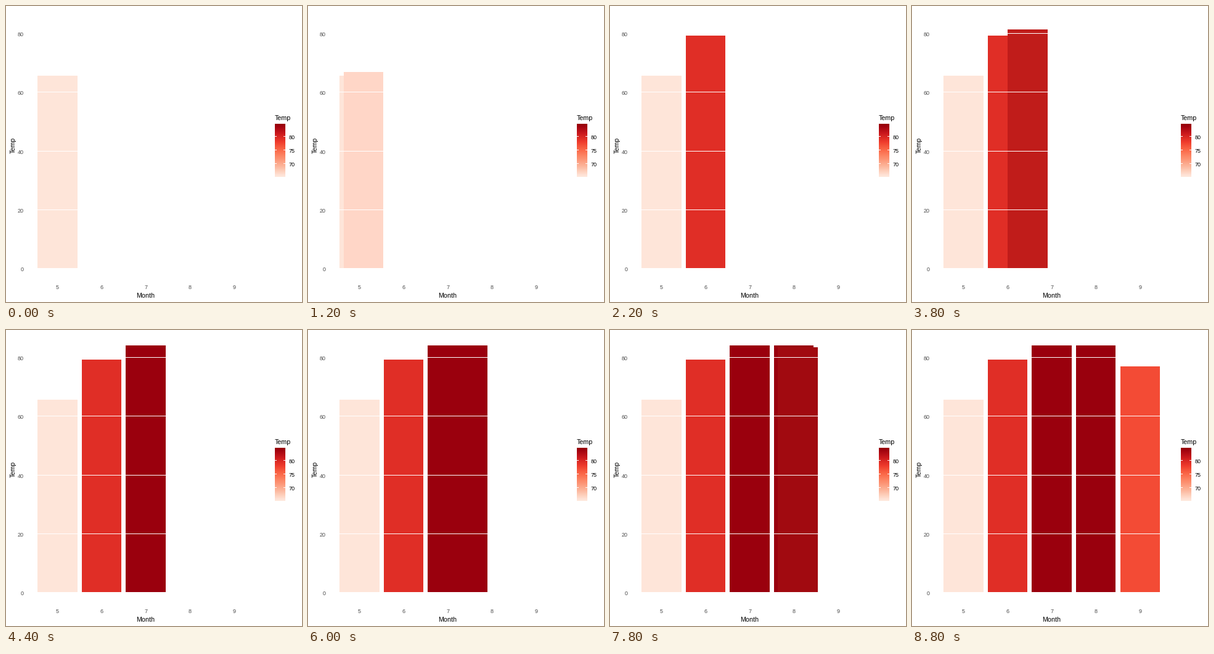
Recreate the animation shown at these times as a matplotlib script. Size 480x480 px, loop 10 s.

```python
import numpy as np
import matplotlib.pyplot as plt
from matplotlib.animation import FuncAnimation
from matplotlib.patches import Rectangle

SIZE, DPI = 480, 80
MONTHS = [5, 6, 7, 8, 9]
TEMPS = np.array([65.548, 79.1, 83.903, 83.968, 76.9])
REDS = ["FEE5D9", "FCBBA1", "FC9272", "FB6A4A", "EF3B2C", "CB181D", "99000D"]

# Timing in frames of 100 ms
FRAMES, INTERVAL = 100, 100
HOLD, MOVE = 11, 11

# Plot geometry in pixels
X0, STEP, BAR_W = 83.6, 71.53, 64.4
Y0, Y_SCALE = 425.4, 4.762

XYZ = np.array([[0.4124, 0.3576, 0.1805],
                [0.2126, 0.7152, 0.0722],
                [0.0193, 0.1192, 0.9505]])
WHITE = XYZ.sum(axis=1)


def to_lab(rgb):
    lin = np.where(rgb <= 0.04045, rgb / 12.92, ((rgb + 0.055) / 1.055) ** 2.4)
    v = XYZ @ lin / WHITE
    f = np.where(v > 0.008856, np.cbrt(v), 7.787 * v + 16 / 116)
    return np.array([116 * f[1] - 16, 500 * (f[0] - f[1]), 200 * (f[1] - f[2])])


def to_rgb(lab):
    fy = (lab[0] + 16) / 116
    f = np.array([fy + lab[1] / 500, fy, fy - lab[2] / 200])
    v = np.where(f > 0.2069, f ** 3, (f - 16 / 116) / 7.787)
    lin = np.clip(np.linalg.solve(XYZ, v * WHITE), 0, 1)
    rgb = np.where(lin <= 0.0031308, lin * 12.92, 1.055 * lin ** (1 / 2.4) - 0.055)
    return np.clip(rgb, 0, 1)


def mix(a, b, t):
    return a + (b - a) * t


STOPS = [to_lab(np.array(list(bytes.fromhex(h))) / 255) for h in REDS]


def scale_lab(f):
    """Lab colour at fraction f of the fill scale."""
    p = np.clip(f, 0, 1) * (len(STOPS) - 1)
    i = min(int(p), len(STOPS) - 2)
    return mix(STOPS[i], STOPS[i + 1], p - i)


LOW, HIGH = TEMPS.min(), TEMPS.max()
BAR_LABS = [scale_lab((t - LOW) / (HIGH - LOW)) for t in TEMPS]

fig = plt.figure(figsize=(SIZE / DPI, SIZE / DPI), dpi=DPI, facecolor="white")
ax = fig.add_axes([0, 0, 1, 1])
plt.rcParams["font.family"] = "Liberation Sans"


def box(x, y, w, h, color, z=1):
    return ax.add_patch(Rectangle((x, y), w, h, facecolor=color, lw=0, zorder=z))


def label(x, y, s, px=9, color="black", ha="left", **kw):
    ax.text(x, y, s, size=px * 72 / DPI, color=color, ha=ha, va="baseline", **kw)


def place(bar, pos):
    """Put a bar at a position along the sequence of months."""
    i = min(int(pos), len(TEMPS) - 2)
    t = pos - i
    left = X0 + STEP * pos - BAR_W / 2
    x1, x2 = round(left), round(left + BAR_W)
    top = int(Y0 - Y_SCALE * mix(TEMPS[i], TEMPS[i + 1], t))
    bar.set_bounds(x1, top, x2 - x1, int(Y0) - top)
    bar.set_facecolor(to_rgb(mix(BAR_LABS[i], BAR_LABS[i + 1], t)))


def draw_axes():
    grey = "#4D4D4D"
    for v in range(0, 81, 20):
        y = int(Y0 - Y_SCALE * v + 0.1)
        box(48, y, 358, 1, "white", z=4)
        label(29, y + 5, str(v), color=grey, ha="right")
    for i, m in enumerate(MONTHS):
        label(X0 + STEP * i, 459, str(m), color=grey, ha="center")
    label(226.5, 473, "Month", px=10.7, ha="center")
    label(15, 225.5, "Temp", px=10.7, ha="center",
          rotation=90, rotation_mode="anchor")


def draw_legend():
    x, y, w, h, bins = 436, 191, 17, 86, 20
    label(x, 185, "Temp", px=10.7)
    cells = (1 - (np.arange(h) + 0.5) / h) * bins - 0.5
    column = np.array([[to_rgb(scale_lab(c / (bins - 1)))] for c in cells])
    ax.imshow(column, extent=(x, x + w, y + h, y), aspect="auto",
              interpolation="nearest")
    for v in (70, 75, 80):
        f = (v - LOW) / (HIGH - LOW)
        row = int(y + h - h * (0.5 + (bins - 1) * f) / bins + 0.3)
        box(x, row, 3, 1, "white", z=4)
        box(x + w - 3, row, 3, 1, "white", z=4)
        label(459, row + 5, str(v))


draw_axes()
draw_legend()
ax.set_xlim(0, SIZE)
ax.set_ylim(SIZE, 0)
ax.axis("off")

marks = [box(0, 0, 1, 1, "white", z=2) for _ in TEMPS]
for i, mark in enumerate(marks):
    place(mark, i)
mover = box(0, 0, 1, 1, "white", z=3)


def update(frame):
    starts = HOLD + (HOLD + MOVE) * np.arange(len(TEMPS) - 1)
    steps = int(np.clip(frame - starts, 0, MOVE).sum())
    for i, mark in enumerate(marks):
        mark.set_visible(i * MOVE <= steps)
    place(mover, steps / MOVE)
    return [*marks, mover]


anim = FuncAnimation(fig, update, frames=FRAMES, interval=INTERVAL,
                     repeat=True, repeat_delay=0, blit=False)
plt.show()
```
